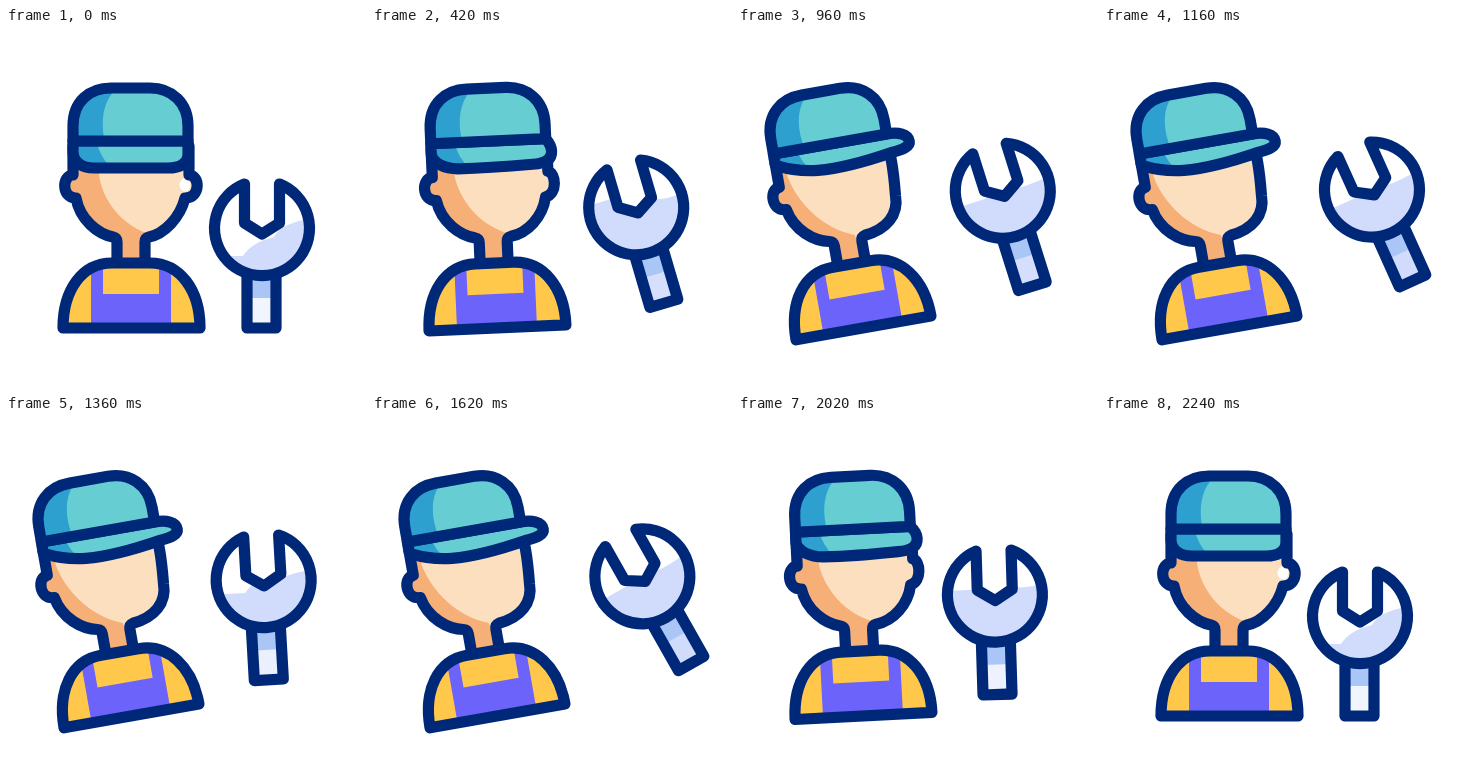
An HTML page for the animation above (2400 ms loop, 360 px wide and 360 px high).

```html
<!DOCTYPE html>
<html lang="en">
<head>
<meta charset="utf-8">
<title>Mechanic</title>
<style>
  html, body { margin: 0; width: 100%; height: 100%; overflow: hidden; background: #fff; }
  svg { display: block; width: 100vw; height: 100vh; }
  .line { fill: none; stroke: #002878; stroke-width: 11.2; stroke-linejoin: round; stroke-linecap: round; }
</style>
</head>
<body>
<svg viewBox="0 0 360 360">
  <defs>
    <path id="head"/>
    <path id="brim"/>
    <path id="crown" d="M67 113V98C67 73 84 60 105 60H144C166 60 182 75 182 98V113Z"/>
    <path id="body" d="M57 300C57 262 76 235 106 235H144C174 235 194 262 194 300Z"/>
    <path id="jaw" d="M238.5 156A47.5 47.5 0 1 0 273.5 156V195L256 206L238.5 195Z"/>
    <path id="handle" d="M241 246H270V300H241Z"/>
    <clipPath id="inHead"><use href="#head"/></clipPath>
    <clipPath id="inBrim"><use href="#brim"/></clipPath>
    <clipPath id="inCrown"><use href="#crown"/></clipPath>
    <clipPath id="inBody"><use href="#body"/></clipPath>
    <clipPath id="inJaw"><use href="#jaw"/></clipPath>
  </defs>

  <g id="person">
    <use href="#head" fill="#fcdfbf"/>
    <g clip-path="url(#inHead)">
      <path id="faceShade" fill="#f6b077"/>
      <ellipse id="glint" cx="179" cy="157" rx="5.5" ry="6.5" fill="#fff"/>
    </g>
    <use href="#head" class="line"/>

    <use href="#brim" fill="#66ced2"/>
    <path clip-path="url(#inBrim)" fill="#2da0cf" d="M60 110H90Q93 130 108 142H60Z"/>
    <use href="#brim" class="line"/>
    <use href="#crown" fill="#66ced2"/>
    <path clip-path="url(#inCrown)" fill="#2da0cf" d="M60 55H118C99 66 93 88 99 115H60Z"/>
    <use href="#crown" class="line"/>

    <use href="#body" fill="#ffc84a"/>
    <path clip-path="url(#inBody)" fill="#6c63fa" d="M85 230H97V266H153V230H165V300H85Z"/>
    <use href="#body" class="line"/>
  </g>

  <g id="wrench">
    <use href="#handle" fill="#fff"/>
    <use id="handleTint" href="#handle" fill="#d1dcfd"/>
    <path fill="#a9c6f6" d="M241 246H270V270H241Z"/>
    <use href="#handle" class="line"/>
    <use href="#jaw" fill="#fff"/>
    <path id="jawShade" clip-path="url(#inJaw)" fill="#d1dcfd"/>
    <use href="#jaw" class="line"/>
  </g>
</svg>
<script>
const LOOP = 2400;
const $ = id => document.getElementById(id);

// Each shape facing front, then turned to the side, with matching commands.
const shapes = {
  head: [
    "M67 118L67 147C56 147 55 170 70 170C74 192 92 206 107 209Q111 210 111 214L111 240L139 240L139 214Q139 210 143 209C158 206 174 190 179 170C195 170 194 147 183 147L183 118Z",
    "M67 118L67 147C56 147 55 170 70 170C74 192 92 206 107 209Q111 210 111 214L111 240L139 240L139 214Q139 210 143 209C165 207 180 195 180 175C181 165 182 150 182 142L182 118Z"
  ],
  brim: [
    "M67 113L182 113C182 118 182 122 182 126C182 136 174 140 162 140C140 140 110 140 88 140C76 140 67 134 67 124Z",
    "M67 113L182 113C194 113 203 117 203 124C203 129 196 131 185 132C160 136 130 139 108 137C90 135 74 129 67 124Z"
  ],
  faceShade: [
    "M50 120L93 120L93 146C96 172 116 199 147 207L139 245L50 245Z",
    "M50 120L77 120L77 138C82 165 102 195 133 207L139 245L50 245Z"
  ]
};

function morph([front, side], p) {
  const number = /[\d.]+/g, ends = side.match(number);
  let i = 0;
  return front.replace(number, n => (+n + (ends[i++] - n) * p).toFixed(2));
}

// Eased value at time t through [time, value] keys.
function track(keys, t) {
  if (t <= keys[0][0]) return keys[0][1];
  for (let i = 1; i < keys.length; i++) {
    const [t0, a] = keys[i - 1], [t1, b] = keys[i];
    if (t < t1) return a + (b - a) * (1 - Math.cos(Math.PI * (t - t0) / (t1 - t0))) / 2;
  }
  return keys[keys.length - 1][1];
}

const turnKeys = [[220, 0], [820, 1], [1640, 1], [2240, 0]];
const liftKeys = [[220, 0], [600, 1], [1850, 1], [2240, 0]];
const swingKeys = [[220, 0], [600, 30], [830, 3], [1080, 30], [1345, 3], [1600, 30], [1850, 3], [2240, 0]];

function draw(t) {
  const turn = track(turnKeys, t), lift = track(liftKeys, t), swing = track(swingKeys, t);

  for (const id in shapes) $(id).setAttribute("d", morph(shapes[id], turn));
  $("glint").setAttribute("opacity", turn < 0.01 ? 1 : 0);
  $("person").setAttribute("transform", `rotate(${-10 * turn} 125 300)`);

  $("wrench").setAttribute("transform", `translate(0 ${-36 * lift}) rotate(${-swing} 256 171)`);
  const tilt = Math.min(swing / 20, 1);
  const left = 228 - 14 * lift - 13 * tilt - 25 * Math.sin(Math.PI * lift);
  const right = 190 + 11 * tilt;
  $("jawShade").setAttribute("d",
    `M205 ${left}H237Q246 ${left - 14} 268 ${(left + right) / 2}Q276 ${right + 4} 310 ${right}V255H205Z`);
  $("handleTint").setAttribute("opacity", 0.3 + 0.7 * tilt);
}

function frame(now) {
  draw(now % LOOP);
  requestAnimationFrame(frame);
}
draw(0);
requestAnimationFrame(frame);
</script>
</body>
</html>
```
